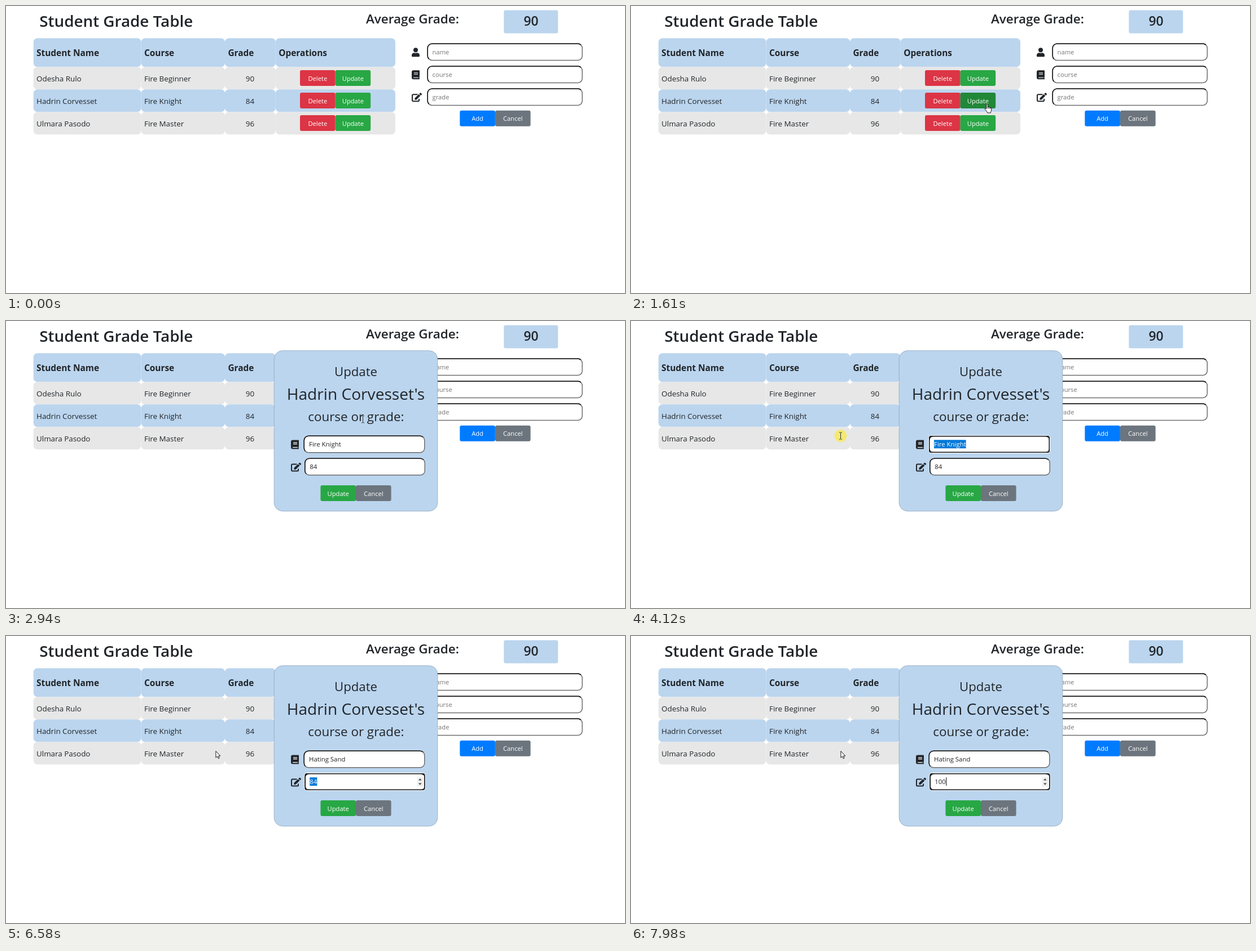
These frames come from a looping animation (1097 px wide and 510 px high, 8 s). An HTML page:

```html
<!DOCTYPE html>
<html lang="en">
<head>
<meta charset="utf-8">
<title>Student Grade Table</title>
<style>
  html, body { margin: 0; width: 100%; height: 100%; overflow: hidden; background: #fff; }
  svg { display: block; width: 100%; height: 100%; font-family: "Open Sans", "Noto Sans", sans-serif; }
  text { fill: #212529; white-space: pre; }
</style>
</head>
<body>
<svg id="stage" viewBox="0 0 1097 510"></svg>
<script>
const LOOP = 8000;
const BLUE = '#bbd5ee', GREY = '#e7e7e7', INK = '#212529';
const RED = '#dc3545', GREEN = '#28a745', DARK_GREEN = '#218838', SLATE = '#6c757d';
const FIELD_SIZE = 11.4, FIELD_H = 31, ROW = 40;

const label = (x, y, size, str, attrs = '') =>
  `<text x="${x}" y="${y}" font-size="${size}" ${attrs}>${str}</text>`;
const MIDDLE = 'text-anchor="middle"';
const SEMI = 'font-weight="600"';

const box = (x, y, w, h, r, fill, attrs = '') =>
  `<rect x="${x}" y="${y}" width="${w}" height="${h}" rx="${r}" fill="${fill}" ${attrs}/>`;

const button = (x, y, str, fill, id = '') =>
  box(x, y, 62.6, 28, 3, fill, id && `id="${id}"`) +
  label(x + 31.3, y + 18.6, 11.2, str, `${MIDDLE} style="fill:#fff"`);

// Inset border: dark on the top and left, lighter on the bottom and right.
function field(x, y, w) {
  const r = 8, k = r * (1 - Math.SQRT1_2);
  const l = x + .75, t = y + .75, e = x + w - .75, b = y + FIELD_H - .75;
  const arc = `A${r} ${r} 0 0 1`;
  return box(l, t, e - l, b - t, r, '#fff', 'stroke="#6f6f6f" stroke-width="1.5"') +
    `<path d="M${l + k} ${b - k}${arc} ${l} ${b - r}V${t + r}${arc} ${l + r} ${t}H${e - r}${arc} ${e - k} ${t + k}"
      fill="none" stroke="#141414" stroke-width="1.5"/>`;
}

const focusRing = (id, x, y, w) => `<g id="${id}">` +
  box(x, y, w, FIELD_H, 4, 'none', 'stroke="#fff"') +
  box(x + 1.25, y + 1.25, w - 2.5, FIELD_H - 2.5, 3, 'none', 'stroke="#101010" stroke-width="1.5"') + '</g>';

const ICONS = {
  user: `<circle cx="7" cy="4" r="4"/>
    <path d="M4.2 9h.6a5.4 5.4 0 0 0 4.4 0h.6A4.2 4.2 0 0 1 14 13.2v1.3a1.5 1.5 0 0 1-1.5 1.5h-11A1.5 1.5 0 0 1 0 14.5v-1.3A4.2 4.2 0 0 1 4.2 9z"/>`,
  book: `<path d="M3 0H13.2a.8.8 0 0 1 .8.8V11.2a.8.8 0 0 1-.3.6q-.3 1.2 0 2.3a.8.8 0 0 1 .3.6v.5a.8.8 0 0 1-.8.8H3a3 3 0 0 1-3-3V3a3 3 0 0 1 3-3z"/>
    <path d="M4 4.5h7M4 7h7M3 13h8.9" stroke="#fff" stroke-width="1.1"/>`,
  edit: `<path d="M10.5 3H2.4A1.4 1.4 0 0 0 1 4.4V13.6A1.4 1.4 0 0 0 2.4 15H11.6A1.4 1.4 0 0 0 13 13.6V10.8"
      fill="none" stroke="${INK}" stroke-width="2"/>
    <path d="M12.6 2.6l2.8 2.8L8.6 12.2l-2.5.3a.7.7 0 0 1-.8-.8l.3-2.5zM13.3 1.9l1.2-1.3a1.5 1.5 0 0 1 2.1 0l.9.9a1.5 1.5 0 0 1 0 2.1l-1.4 1.1z"/>`
};
const icon = (name, x, y) => `<g transform="translate(${x} ${y})" fill="${INK}">${ICONS[name]}</g>`;

function table() {
  const edges = [48.7, 239.6, 388, 477.8, 690];
  const cells = (y, h, fill) =>
    edges.slice(1).map((e, i) => box(edges[i], y, e - edges[i], h, 7, fill)).join('');
  const heads = ['Student Name', 'Course', 'Grade', 'Operations'];
  const rows = [
    ['Odesha Rulo', 'Fire Beginner', 90],
    ['Hadrin Corvesset', 'Fire Knight', 84],
    ['Ulmara Pasodo', 'Fire Master', 96]
  ];
  return cells(57.3, 51, BLUE) +
    heads.map((h, i) => label(edges[i] + 5.4, 89.3, 15.4, h, 'font-weight="700"')).join('') +
    rows.map(([name, course, grade], i) => {
      const y = 108.2 + ROW * i;
      return cells(y, ROW, i % 2 ? BLUE : GREY) +
        label(54, y + 25.7, 13.4, name) +
        label(245, y + 25.7, 13.4, course) +
        label(432.4, y + 25.7, 13.4, grade, MIDDLE) +
        button(521, y + 5.8, 'Delete', RED) +
        button(583.6, y + 5.8, 'Update', GREEN, 'rowUpdate' + i);
    }).join('');
}

function form() {
  const lines = [['user', 'name'], ['book', 'course'], ['edit', 'grade']];
  return lines.map(([pic, hint], i) => {
    const y = 66.2 + ROW * i;
    return icon(pic, 719, y + 8) + field(746.4, y, 275.6) +
      label(755.6, y + 19.7, 11.2, hint, 'style="fill:#757575"');
  }).join('') + button(804.3, 185.8, 'Add', '#007bff') + button(867, 185.8, 'Cancel', SLATE);
}

const spinner = box(728.5, 250.5, 11.5, 17, 0, '#efefef') +
  '<path d="M731 256.5l2.8-3.3 2.8 3.3zM731 261.5l2.8 3.3 2.8-3.3z" fill="#444"/>';

const entry = (id, x, y) =>
  `<rect id="${id}Mark" x="${x}" y="${y - 12}" height="15" fill="#0078d7"/>` +
  label(x, y, FIELD_SIZE, '', `id="${id}Text"`) +
  `<rect id="${id}Caret" y="${y - 12}" width="1" height="15" fill="#000"/>`;

function modal() {
  const course = [527.5, 203.5, 215], grade = [529, 243.5, 214];
  return '<g id="modal">' +
    box(475.2, 52.7, 289.6, 285.2, 15, BLUE, 'stroke="#8fa5ba" stroke-width=".8"') +
    label(620, 98, 22.2, 'Update', MIDDLE) +
    label(620, 139.8, 28.1, "Hadrin Corvesset's", MIDDLE) +
    label(620.4, 178, 22.4, 'course or grade:', MIDDLE) +
    icon('book', 505, 211.6) + field(...course) + focusRing('courseRing', ...course) +
    icon('edit', 505, 251.6) + field(...grade) + focusRing('gradeRing', ...grade) +
    entry('course', 537, 223.3) + entry('grade', 538.3, 263.2) +
    `<g id="spinner">${spinner}</g>` +
    button(557.4, 292, 'Update', GREEN) + button(620, 292, 'Cancel', SLATE) +
    '<g id="hints">' +
    box(529.5, 276, 213, 38, 3, '#fff', 'stroke="#c8c8c8" stroke-width=".8"') +
    label(538.3, 299, FIELD_SIZE, '100') + '</g></g>';
}

const OUTLINE = 'fill="#fff" stroke="#000" stroke-width=".9" stroke-linejoin="round"';
const pointers = `
  <circle id="press" r="11" fill="#ffeb00" fill-opacity=".5"/>
  <path id="arrow" ${OUTLINE} d="M.4.6V12.2L3 9.8 4.8 13.8 6.6 13 4.9 9.1H8.4Z"/>
  <path id="hand" ${OUTLINE} d="M-1.3 8.8V1.2a1.2 1.2 0 0 1 2.4 0V6q1.2-.9 2.3.3 1.2-.6 2.1.5 2-.2 2 1.6v3c0 1.5-1 2.3-1.2 3.4v1.5H.2V15C-.8 13.2-2.4 11.7-3.8 9.8c-.6-1 .4-1.9 1.3-1.3zM1.1 6v2.8M3.4 6.5v2.4M5.5 7v2"/>
  <path id="beam" fill="none" stroke="#333" d="M-2.5-6H-.7L0-5.4.7-6H2.5M0-5.4V5.4M-2.5 6H-.7L0 5.4.7 6H2.5"/>`;

document.getElementById('stage').innerHTML =
  label(59.3, 36.8, 27.8, 'Student Grade Table', SEMI) +
  label(638, 30.7, 22.45, 'Average Grade:', SEMI) +
  box(882.3, 7.5, 96, 41, 3, BLUE) +
  label(930.4, 34.8, 22.8, '90', `${MIDDLE} ${SEMI}`) +
  table() + form() + modal() + pointers;

const $ = id => document.getElementById(id);
const show = (id, on) => $(id).setAttribute('visibility', on ? 'inherit' : 'hidden');

// Stepped pointer moves; each starts where the one before it ended.
const moves = [
  { t0: 460, t1: 1150, steps: 10, to: [657, 195.5], ease: 1.7 },
  { t0: 1250, t1: 1250, steps: 1, to: [650, 191], ease: 1 },
  { t0: 1300, t1: 1610, steps: 5, to: [631.2, 173.6], ease: 1.5 },
  { t0: 2940, t1: 2940, steps: 1, to: [632.5, 174.8], ease: 1 },
  { t0: 3260, t1: 3560, steps: 5, to: [556.5, 226], ease: 1.4 },
  { t0: 3640, t1: 3720, steps: 2, to: [598, 221], ease: 1 },
  { t0: 4030, t1: 4110, steps: 2, to: [371.5, 204], ease: 1.5 }
];

function pointerAt(t) {
  let pos = [1034, 503.5];
  for (const { t0, t1, steps, to, ease } of moves) {
    if (t < t0) break;
    const span = steps > 1 ? (t1 - t0) / (steps - 1) : 1;
    const done = Math.min(steps, Math.floor((t - t0) / span + .001) + 1);
    const p = 1 - (1 - done / steps) ** ease;
    pos = pos.map((v, i) => v + (to[i] - v) * p);
  }
  return pos;
}

const courseKeys = [4880, 5030, 5180, 5260, 5340, 5490, 5570, 5880, 6030, 6180, 6280];
const gradeKeys = [7590, 7740, 7910];
const typed = (str, keys, t, before) =>
  str.slice(0, keys.filter(k => t >= k).length) || before;

const pen = document.createElement('canvas').getContext('2d');
function textWidth(str) {
  pen.font = `${FIELD_SIZE}px "Open Sans", "Noto Sans", sans-serif`;
  return pen.measureText(str).width;
}

function setEntry(id, x, str, marked, caret) {
  const w = textWidth(str);
  $(id + 'Text').textContent = str;
  $(id + 'Text').style.fill = marked ? '#fff' : '#222';
  $(id + 'Mark').setAttribute('width', w);
  $(id + 'Caret').setAttribute('x', x + w + .5);
  show(id + 'Mark', marked);
  show(id + 'Caret', caret);
}

function draw(t) {
  const within = (a, b) => t >= a && t < b;
  const [x, y] = pointerAt(t);
  const open = t >= 2940;
  const hover = !open && x < 646 && y < 182;

  $('rowUpdate1').setAttribute('fill', hover ? DARK_GREEN : GREEN);
  show('modal', open);

  show('courseRing', within(3950, 6580));
  show('gradeRing', t >= 6580);
  show('spinner', t >= 6580);
  show('hints', within(7670, 7980));
  setEntry('course', 537, typed('Hating Sand', courseKeys, t, 'Fire Knight'),
    within(4030, 4880), within(3950, 4030) || within(4880, 6580));
  setEntry('grade', 538.3, typed('100', gradeKeys, t, '84'), within(6580, 7590), t >= 7590);

  const beam = within(2940, 4190);
  show('hand', hover);
  show('beam', beam);
  show('arrow', t >= 460 && !hover && !beam);
  show('press', within(2850, 2940) || within(3950, 4190));
  for (const id of ['hand', 'beam', 'arrow', 'press'])
    $(id).setAttribute('transform', `translate(${x} ${y})`);
}

function tick() {
  draw(performance.now() % LOOP);
  requestAnimationFrame(tick);
}
tick();
</script>
</body>
</html>
```
